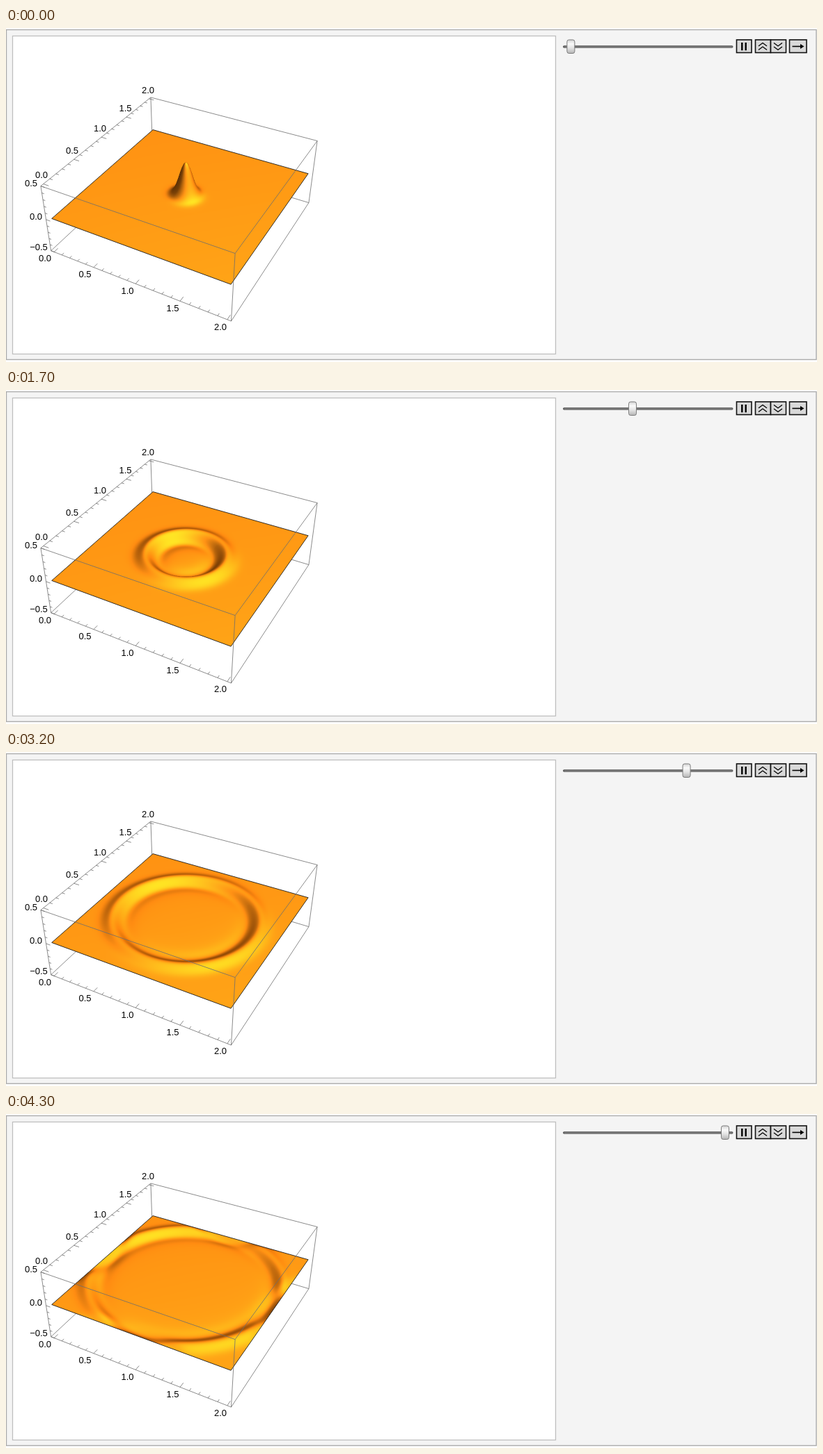
An HTML page with a canvas for the animation above (4.5 s loop, 1165 px wide and 481 px high).

```html
<!DOCTYPE html>
<html lang="en">
<head>
<meta charset="utf-8">
<title>Wave on a square membrane</title>
<style>
  html, body { margin: 0; width: 100%; height: 100%; overflow: hidden; background: #fff; }
  svg, canvas { position: absolute; left: 0; top: 0; display: block; }
  #surface { left: 50px; top: 130px; width: 400px; height: 250px; }
  text { font: 13px "Liberation Sans", Arial, sans-serif; text-anchor: middle; fill: #000; }
  .box { stroke: #6e6e6e; stroke-width: .8; fill: none; }
  .rim { stroke: #1c1c1c; stroke-width: .9; fill: none; }
  .button { fill: #d9d9d9; stroke: #111; stroke-width: 1.6; }
  .icon { fill: none; stroke: #000; stroke-width: 1.3; }
</style>
</head>
<body>
<svg width="1165" height="481">
  <rect x=".5" y="2.5" width="1163.5" height="475" fill="#f4f4f4" stroke="#ababab" stroke-width="1.4"/>
  <rect x="9.5" y="11.5" width="780" height="458" fill="#fff" stroke="#bfbfbf" stroke-width="1.3"/>
  <path id="backEdges" class="box"/>
</svg>
<canvas id="surface" width="800" height="500"></canvas>
<svg width="1165" height="481">
  <defs>
    <linearGradient id="metal" x2="0" y2="1">
      <stop offset="0" stop-color="#d2d2d2"/>
      <stop offset=".3" stop-color="#fafafa"/>
      <stop offset=".6" stop-color="#e4e4e4"/>
      <stop offset="1" stop-color="#b4b4b4"/>
    </linearGradient>
  </defs>
  <path id="rim" class="rim"/>
  <path id="frontEdges" class="box"/>
  <path id="ticks" class="box"/>
  <g id="labels"></g>

  <rect x="800" y="25.3" width="244.5" height="3.4" rx="1.7" fill="#5c5c5c"/>
  <path d="M802 27.2H1043" stroke="#8e8e8e" stroke-width="1.1"/>
  <rect id="knob" x="-5.5" y="17" width="11" height="19.5" rx="2.8" fill="url(#metal)" stroke="#7b7b7b"/>

  <rect class="button" x="1049.5" y="17" width="21.5" height="18.5"/>
  <path d="M1057.3 21V32.2M1062.7 21V32.2" stroke="#000" stroke-width="2.4"/>
  <rect class="button" x="1076.5" y="17" width="22" height="18.5"/>
  <rect class="button" x="1098.5" y="17" width="22" height="18.5"/>
  <path class="icon" d="M1081 26L1087 21.5L1093 26M1081 31.5L1087 27L1093 31.5"/>
  <path class="icon" d="M1103 21.5L1109 26L1115 21.5M1103 27L1109 31.5L1115 27"/>
  <rect class="button" x="1125.5" y="17" width="24.5" height="18.5"/>
  <path d="M1129.5 26.5H1143" stroke="#000" stroke-width="1.6"/>
  <path d="M1141 23L1146.5 26.5L1141 30Z"/>
</svg>

<script>
const LOOP = 4500, STEPS = 21;
const $ = id => document.getElementById(id);

// Vectors and camera; the plot box measures 1 x 1 x 0.4
const dot = (a, b) => a[0] * b[0] + a[1] * b[1] + a[2] * b[2];
const cross = (a, b) => [a[1] * b[2] - a[2] * b[1], a[2] * b[0] - a[0] * b[2], a[0] * b[1] - a[1] * b[0]];
const unit = a => { const l = Math.hypot(...a); return a.map(c => c / l); };

const EYE = [1.3, -2.4, 2], DISTANCE = Math.hypot(...EYE);
const toward = unit(EYE), right = unit([2.4, 1.3, 0]), up = cross(toward, right);
const SPAN = 2.08, HEIGHT = 0.4, FOCAL = 954.5, LO = -0.04, HI = 2.04;

const place = (x, y, z) => [(x - 1) / SPAN, (y - 1) / SPAN, z * HEIGHT];
function project(x, y, z) {
  const p = place(x, y, z), k = FOCAL / (DISTANCE - dot(p, toward));
  return [258.4 + dot(p, right) * k, 240.6 - dot(p, up) * k];
}
const path = (...points) => 'M' + points.map(p => project(...p).map(c => c.toFixed(2)).join(' ')).join('L');

// Box, axes and labels
function drawAxes() {
  const b = -0.5, t = 0.5, hidden = [LO, HI, b];
  $('backEdges').setAttribute('d', path([LO, LO, b], hidden, [HI, HI, b]) + path(hidden, [LO, HI, t]));
  $('frontEdges').setAttribute('d',
    path([LO, LO, t], [HI, LO, t], [HI, HI, t], [LO, HI, t], [LO, LO, t], [LO, LO, b], [HI, LO, b], [HI, HI, b], [HI, HI, t]) +
    path([HI, LO, t], [HI, LO, b]));
  $('rim').setAttribute('d', path([0, 0, 0], [2, 0, 0], [2, 2, 0], [0, 2, 0]) + 'Z');

  let ticks = '';
  for (let i = 0; i <= 20; i++) {
    const v = i / 10, size = i % 5 ? 0.035 : 0.065;
    ticks += path([v, LO, b], [v, LO + size, b]) + path([LO, v, t], [LO + size, v, t]);
    if (i <= 10) ticks += path([LO, LO, v - 0.5], [LO + size * 0.8, LO, v - 0.5]);
  }
  $('ticks').setAttribute('d', ticks);

  const plane = ['0.0', '0.5', '1.0', '1.5', '2.0'];
  const axes = [
    [plane, [[56, 332], [113.5, 355], [174.5, 379], [239.5, 404], [308, 431]]],
    [plane, [[51, 212], [95, 176.5], [135, 145], [171.5, 116], [204, 90]]],
    [['0.5', '0.0', '\u22120.5'], [[36, 223.5], [43, 271.5], [47, 316]]]
  ];
  $('labels').innerHTML = axes.map(([names, spots]) =>
    names.map((s, i) => `<text x="${spots[i][0]}" y="${spots[i][1] + 4.3}">${s}</text>`).join('')).join('');
}

// Wave equation on [0,2]² with a fixed rim, leapfrog in time
const N = 200, W = N + 1, CELL = 2 / N, SUBSTEPS = 8, STEP_TIME = 0.05;
function simulate() {
  const courant = (STEP_TIME / SUBSTEPS / CELL) ** 2;
  let now = new Float32Array(W * W), before;
  for (let j = 1; j < N; j++)
    for (let i = 1; i < N; i++)
      now[j * W + i] = 0.5 * Math.exp(-100 * ((i * CELL - 1) ** 2 + (j * CELL - 1) ** 2));
  const states = [now];
  for (let n = 1; n <= (STEPS - 1) * SUBSTEPS; n++) {
    const next = new Float32Array(W * W);
    for (let j = 1; j < N; j++)
      for (let i = 1; i < N; i++) {
        const k = j * W + i;
        const pull = courant * (now[k - 1] + now[k + 1] + now[k - W] + now[k + W] - 4 * now[k]);
        next[k] = before ? 2 * now[k] - before[k] + pull : now[k] + pull / 2;
      }
    before = now;
    now = next;
    if (n % SUBSTEPS === 0) states.push(now);
  }
  return states;
}

// Three lights fixed to the view, with a broad highlight
const BASE = [0.8807, 0.611, 0.1421], AMBIENT = [0.301, 0.2241, 0.0905], LIGHT = [0.2642, 0.1833, 0.0426];
const lights = [[-0.25, 1.75, 1.75], [1.75, 1.75, 1.75], [1.75, -0.25, 1.75]]
  .map(l => unit([0, 1, 2].map(c => l[0] * right[c] + l[1] * up[c] + l[2] * toward[c])));

function shade(normal, point) {
  const view = unit(EYE.map((e, c) => e - point[c]));
  let diffuse = 0, gloss = 0;
  for (const l of lights) {
    const facing = dot(normal, l);
    diffuse += Math.max(0, facing);
    const half = unit([l[0] + view[0], l[1] + view[1], l[2] + view[2]]);
    if (facing > 0) gloss += Math.max(0, dot(normal, half)) ** 3;
  }
  return BASE.map((b, c) => 255 * Math.min(1, b * (AMBIENT[c] + LIGHT[c] * diffuse) + LIGHT[c] * gloss));
}

// Surface painted back to front at double resolution
const canvas = $('surface'), ctx = canvas.getContext('2d');
const image = ctx.createImageData(canvas.width, canvas.height);

function fillTriangle(a, b, c) {
  const area = (b.x - a.x) * (c.y - a.y) - (b.y - a.y) * (c.x - a.x);
  if (Math.abs(area) < 1e-6) return;
  const x0 = Math.ceil(Math.min(a.x, b.x, c.x) - 0.5), x1 = Math.floor(Math.max(a.x, b.x, c.x) - 0.5);
  const y0 = Math.ceil(Math.min(a.y, b.y, c.y) - 0.5), y1 = Math.floor(Math.max(a.y, b.y, c.y) - 0.5);
  for (let py = y0; py <= y1; py++)
    for (let px = x0; px <= x1; px++) {
      const dx = px + 0.5 - a.x, dy = py + 0.5 - a.y;
      const v = (dx * (c.y - a.y) - dy * (c.x - a.x)) / area;
      const w = (dy * (b.x - a.x) - dx * (b.y - a.y)) / area;
      const u = 1 - v - w;
      if (u < -1e-6 || v < -1e-6 || w < -1e-6) continue;
      const o = 4 * (py * image.width + px);
      for (let k = 0; k < 3; k++) image.data[o + k] = u * a.color[k] + v * b.color[k] + w * c.color[k];
      image.data[o + 3] = 255;
    }
}

function drawSurface(u) {
  const vertices = new Array(W * W), scale = HEIGHT * SPAN;
  for (let j = 0; j < W; j++)
    for (let i = 0; i < W; i++) {
      const k = j * W + i, x = i * CELL, y = j * CELL;
      const w = i ? 1 : 0, e = i < N ? 1 : 0, s = j ? 1 : 0, n = j < N ? 1 : 0;
      const slopeX = scale * (u[k + e] - u[k - w]) / ((e + w) * CELL);
      const slopeY = scale * (u[k + n * W] - u[k - s * W]) / ((n + s) * CELL);
      const [sx, sy] = project(x, y, u[k]);
      vertices[k] = {
        x: 2 * (sx - 50), y: 2 * (sy - 130),
        color: shade(unit([-slopeX, -slopeY, 1]), place(x, y, u[k]))
      };
    }
  image.data.fill(0);
  for (let j = N - 1; j >= 0; j--)
    for (let i = 0; i < N; i++) {
      const k = j * W + i;
      const sw = vertices[k], se = vertices[k + 1], nw = vertices[k + W], ne = vertices[k + W + 1];
      fillTriangle(nw, ne, se);
      fillTriangle(nw, se, sw);
    }
  ctx.putImageData(image, 0, 0);
}

const stepStart = k => 200 * k + 100 * Math.floor((k - 1) / 5);
function stepAt(time) {
  let k = STEPS - 1;
  while (k > 0 && stepStart(k) > time) k--;
  return k;
}

drawAxes();
const states = simulate();
let shown = -1;
function render(time) {
  const k = stepAt(time % LOOP);
  if (k !== shown) {
    shown = k;
    drawSurface(states[k]);
    $('knob').setAttribute('transform', `translate(${811.4 + 11.08 * k} 0)`);
  }
}

render(0);
const origin = performance.now();
(function tick() {
  render(performance.now() - origin);
  requestAnimationFrame(tick);
})();
</script>
</body>
</html>
```
